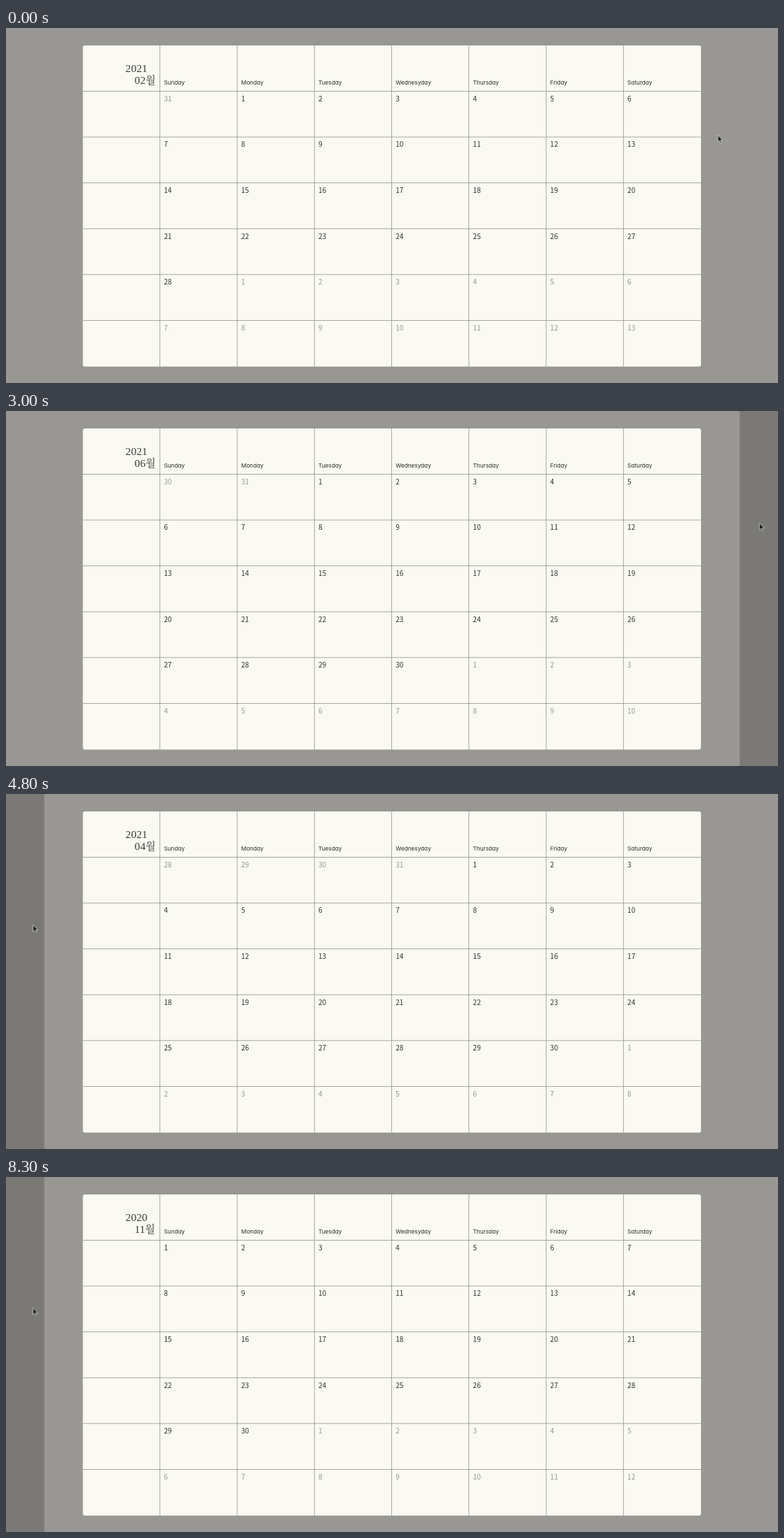
These frames come from a looping animation (1102 by 508 pixels, 9.1 s). An HTML page:

```html
<!DOCTYPE html>
<html lang="ko">
<head>
<meta charset="utf-8">
<title>Calendar</title>
<style>
  html, body { margin: 0; width: 100%; height: 100%; overflow: hidden; background: #999793; }
  svg { display: block; width: 1102px; height: 508px; }
  .line { fill: #999793; }
  .title { font: 15.6px "Liberation Serif", serif; fill: #3d3b38; }
  .title .unit { font: 300 15px "Noto Serif CJK KR", "Noto Sans CJK KR", serif; }
  .week { font: 400 8.2px Inter, sans-serif; font-feature-settings: "cv11"; fill: #2b2b2b; }
  .day { font: 500 10px "Noto Sans CJK KR", "Noto Sans", sans-serif; fill: #2f2f2f; }
  .day.out { font-weight: 400; fill: #959490; }
</style>
</head>
<body>
<svg viewBox="0 0 1102 508">
  <rect width="1102" height="508" fill="#999793"/>
  <rect id="left" width="54.7" height="508"/>
  <rect id="right" x="1047.3" width="54.7" height="508"/>
  <rect x="109.7" y="25" width="882.4" height="459.6" rx="3" fill="#fafaf2"/>
  <g id="grid"></g>
  <g class="title">
    <text id="year" x="170.6" y="63"></text>
    <text x="183.6" y="80"><tspan id="month"></tspan><tspan class="unit">월</tspan></text>
  </g>
  <g id="pointer">
    <path id="arrow" d="M0 0V9.7L2.2 7.7 3.8 11.2 5.3 10.6 3.9 7.2H6.9Z" fill="#222" stroke="#fff" stroke-width=".55"/>
    <path id="hand" d="M2.9 1.3Q3.8 .1 4.7 1.3V4.2H7.6Q9.6 4.4 9.6 6.2V8.4Q9.4 10.4 7.6 10.6H4.7L1 7Q.4 5.7 1.7 5.7L2.9 6.6Z" fill="#fff" stroke="#222" stroke-width=".8"/>
  </g>
</svg>
<script>
const LOOP = 9100, FRAME = 100, COL = 110.27, ROW = 65.6;
const WEEK = ['Sunday', 'Monday', 'Tuesday', 'Wednesyday', 'Thursday', 'Friday', 'Saturday'];

// Strokes of the pointer, each from where the last one ended.
const HOME = { x: 1016.2, y: 153.4 };
const MOVES = [
  { from: 200, to: 600, x: 1081.5, y: 160.4 },
  { from: 1900, to: 2100, x: 1075.4, y: 160.4 },
  { from: 3100, to: 3200, x: 1030.2, y: 170 },
  { from: 3300, to: 3600, x: 73.6, y: 203 },
  { from: 3700, to: 3800, x: 38.5, y: 187.3 }
];

const $ = id => document.getElementById(id);
const clamp = (v, lo, hi) => Math.min(hi, Math.max(lo, v));
const ramp = (t, from, to) => clamp((t - from) / (to - from), 0, 1);

// Evenly spaced clicks, counted in the frame in which they fall.
function clicks(t, first, last, count) {
  const gap = (last - first) / (count - 1);
  return clamp(1 + Math.floor((t + FRAME - 1 - first) / gap), 0, count);
}

function add(tag, attrs, text = '') {
  const el = document.createElementNS('http://www.w3.org/2000/svg', tag);
  for (const key in attrs) el.setAttribute(key, attrs[key]);
  el.textContent = text;
  return $('grid').appendChild(el);
}

WEEK.forEach((name, c) => {
  add('rect', { class: 'line', x: 219.3 + c * COL, y: 25, width: .85, height: 459.6 });
  add('text', { class: 'week', x: 225.5 + c * COL, y: 81.3 }, name);
});
for (let r = 0; r < 6; r++) {
  add('rect', { class: 'line', x: 109.7, y: 90 + r * ROW, width: 882.4, height: .85 });
}
const cells = Array.from({ length: 42 }, (_, i) => add('text', {
  x: 225.5 + (i % 7) * COL, y: 104.8 + Math.floor(i / 7) * ROW
}));

function showMonth(m) {
  const first = new Date(Date.UTC(2021, m, 1));
  const month = first.getUTCMonth(), year = first.getUTCFullYear();
  $('year').textContent = year;
  $('month').textContent = String(month + 1).padStart(2, '0');
  cells.forEach((cell, i) => {
    const date = new Date(Date.UTC(year, month, 1 + i - first.getUTCDay()));
    cell.textContent = date.getUTCDate();
    cell.setAttribute('class', date.getUTCMonth() === month ? 'day' : 'day out');
  });
}

function pointerAt(t) {
  return MOVES.reduce((p, move) => {
    const k = ramp(t, move.from, move.to);
    return { x: p.x + (move.x - p.x) * k, y: p.y + (move.y - p.y) * k };
  }, HOME);
}

let shown;
function draw(now) {
  const t = Math.floor(now % LOOP / FRAME) * FRAME;
  const month = 1 + clicks(t, 1000, 3000, 4) - clicks(t, 4200, 8300, 7);
  if (month !== shown) showMonth(shown = month);

  const { x, y } = pointerAt(t);
  const hand = t >= 3200 && t < 3400;
  $('pointer').setAttribute('transform', `translate(${x} ${y})`);
  $('hand').style.display = hand ? '' : 'none';
  $('arrow').style.display = hand ? 'none' : '';

  $('right').setAttribute('opacity', t < 3200 ? .2 * ramp(t, 300, 700) : 0);
  $('left').setAttribute('opacity', t < 3800 ? 0 : .16 + .04 * ramp(t, 4100, 4200));
}

const start = performance.now();
function tick() {
  draw(performance.now() - start);
  requestAnimationFrame(tick);
}
tick();
</script>
</body>
</html>
```
